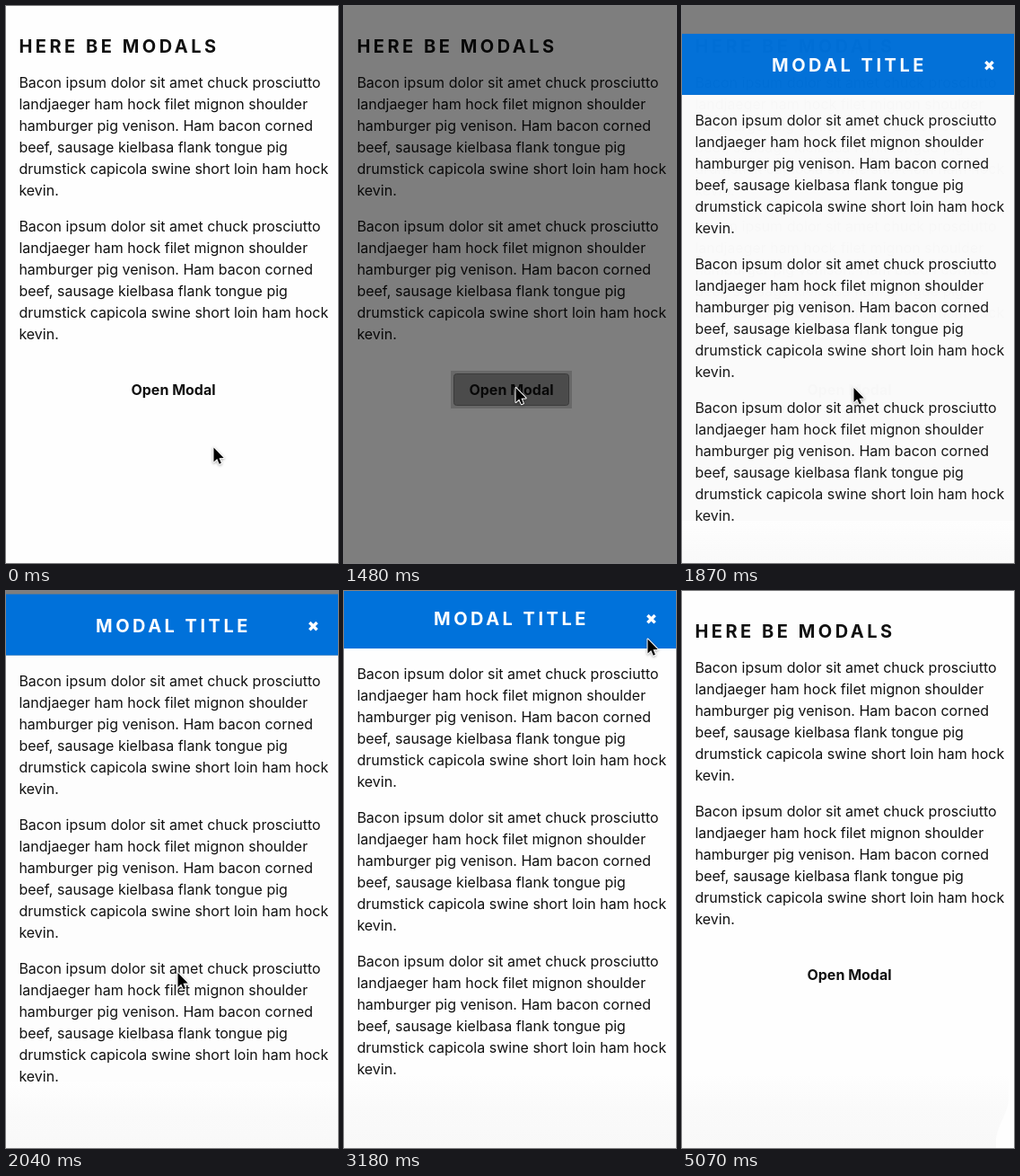
An HTML page with a canvas for the animation above (5370 ms loop, 370x620 px).

```html
<!DOCTYPE html>
<html lang="en">
<head>
<meta charset="utf-8">
<title>Modal</title>
<style>
  html, body { margin: 0; width: 100%; height: 100%; overflow: hidden; background: #fff; }
  canvas { display: block; width: 370px; height: 620px; }
</style>
</head>
<body>
<canvas id="stage" width="370" height="620"></canvas>
<script>
const W = 370, H = 620, LOOP = 5370;
const OPEN = 1480, SLIDE = 1551, CLOSE = 3890;
const MODAL_TOP = -4, SLIDE_DECAY = 111;
const INK = '#111', BLUE = '#0072db', LEFT = 14.4;
const SANS = 'Inter, "Open Sans", sans-serif';
const LINES = [
  'Bacon ipsum dolor sit amet chuck prosciutto',
  'landjaeger ham hock filet mignon shoulder',
  'hamburger pig venison. Ham bacon corned',
  'beef, sausage kielbasa flank tongue pig',
  'drumstick capicola swine short loin ham hock',
  'kevin.'
];
const ARROW = [[0, 0], [0, 16], [3.7, 12.6], [6.2, 18.2], [8.4, 17.3], [6, 11.7], [11.2, 11.5]];

const ctx = document.getElementById('stage').getContext('2d');
const clamp = v => Math.max(0, Math.min(1, v));
const progress = (t, from, to) => clamp((t - from) / (to - from));
const smooth = p => p * p * (3 - 2 * p);
const mix = (a, b, p) => a + (b - a) * p;

function rect(color, x, y, w, h) {
  ctx.fillStyle = color;
  ctx.fillRect(x, y, w, h);
}

function text(string, x, y, { font = `400 16px ${SANS}`, color = INK, spacing = 0, align = 'left' } = {}) {
  ctx.font = font;
  ctx.fillStyle = color;
  ctx.letterSpacing = spacing + 'px';
  ctx.textAlign = align;
  ctx.fillText(string, x, y);
}

function title(string, x, y, color) {
  text(string, x, y, { font: `700 20px ${SANS}`, color, spacing: 3.5 });
}

function paragraphs(count, y) {
  for (let p = 0; p < count; p++) {
    LINES.forEach((line, i) => text(line, LEFT, y + p * 160 + i * 24));
  }
}

function bottomShade(y) {
  const shade = ctx.createLinearGradient(0, y, 0, y + 82);
  shade.addColorStop(0, '#fefefe');
  shade.addColorStop(0.45, '#fafafa');
  shade.addColorStop(1, '#f8f8f8');
  rect(shade, 0, y, W, H);
}

function pressedButton(alpha) {
  ctx.globalAlpha = alpha;
  rect('#d2d2d2', 119, 406, 135, 42);
  ctx.beginPath();
  ctx.roundRect(122.5, 409.5, 128, 35, 3);
  ctx.fillStyle = '#979797';
  ctx.fill();
  ctx.strokeStyle = '#777';
  ctx.lineWidth = 1;
  ctx.stroke();
  ctx.globalAlpha = 1;
}

function page(t) {
  rect('#fefefe', 0, 0, W, H);
  if (t >= CLOSE) {
    bottomShade(538);
    clearTrail(t);
  }
  title('HERE BE MODALS', LEFT, 52, INK);
  paragraphs(2, 91);
  if (t >= OPEN && t < CLOSE) pressedButton(1 - 0.85 * progress(t, 1560, 1700));
  text('Open Modal', 186.5, 433, { font: `700 16px ${SANS}`, align: 'center' });
}

function modal(t) {
  const left = Math.exp(-(t - SLIDE) / SLIDE_DECAY);
  const y = MODAL_TOP + (H - MODAL_TOP) * left;
  ctx.globalAlpha = 1 - Math.pow(left, 1.27);
  rect('#fefefe', 0, y + 68, W, H);
  bottomShade(y + 542);
  rect(BLUE, 0, y, W, 68);
  title('MODAL TITLE', 100, y + 42, '#fff');
  text('✖', 342.5, y + 41, { font: '16px "DejaVu Sans", sans-serif', color: '#fff', align: 'center' });
  paragraphs(3, y + 102);
  ctx.globalAlpha = 1;
}

// The pointer's last sweep, down the right edge
const edgeX = y => 364 - 14 * smooth(progress(y, 565, 612));
const edgeY = t => mix(536, 622, progress(t, 4690, 5070));

function clearTrail(t) {
  if (t < 4700) return;
  const end = Math.min(H, edgeY(t) + 19);
  ctx.beginPath();
  ctx.moveTo(W, 538);
  for (let y = 538; y <= end; y += 3) ctx.lineTo(edgeX(y), y);
  ctx.lineTo(edgeX(end), end);
  ctx.lineTo(W, end);
  ctx.fillStyle = '#fefefe';
  ctx.fill();
}

function pointerAt(t) {
  if (t >= 4700) return t < 5070 ? [edgeX(edgeY(t)), edgeY(t)] : null;
  if (t >= 4560) return null;
  const moves = [
    [610, 1090, 191.5, 425],
    [2600, 3180, 338.5, 53.5],
    [3460, 3590, 342.5, 25]
  ];
  let x = 231.5, y = 491.5;
  for (const [from, to, nextX, nextY] of moves) {
    const p = smooth(progress(t, from, to));
    x = mix(x, nextX, p);
    y = mix(y, nextY, p);
  }
  const exit = progress(t, 4410, 4560) ** 2;
  return [mix(x, 371, exit), mix(y, 290, exit)];
}

function pointer(t) {
  const at = pointerAt(t);
  if (!at) return;
  ctx.save();
  ctx.translate(...at);
  ctx.beginPath();
  ARROW.forEach(([x, y]) => ctx.lineTo(x, y));
  ctx.closePath();
  ctx.shadowColor = 'rgba(0,0,0,.35)';
  ctx.shadowBlur = 3;
  ctx.shadowOffsetY = 1;
  ctx.lineWidth = 2;
  ctx.lineJoin = 'round';
  ctx.strokeStyle = '#fff';
  ctx.stroke();
  ctx.shadowColor = 'transparent';
  ctx.fillStyle = '#000';
  ctx.fill();
  ctx.restore();
}

function draw(now) {
  const t = now % LOOP;
  page(t);
  if (t >= OPEN && t < CLOSE) {
    rect('rgba(0,0,0,.5)', 0, 0, W, H);
    if (t >= SLIDE) modal(t);
  }
  pointer(t);
}

const start = performance.now();
function tick() {
  draw(performance.now() - start);
  requestAnimationFrame(tick);
}
tick();
</script>
</body>
</html>
```
